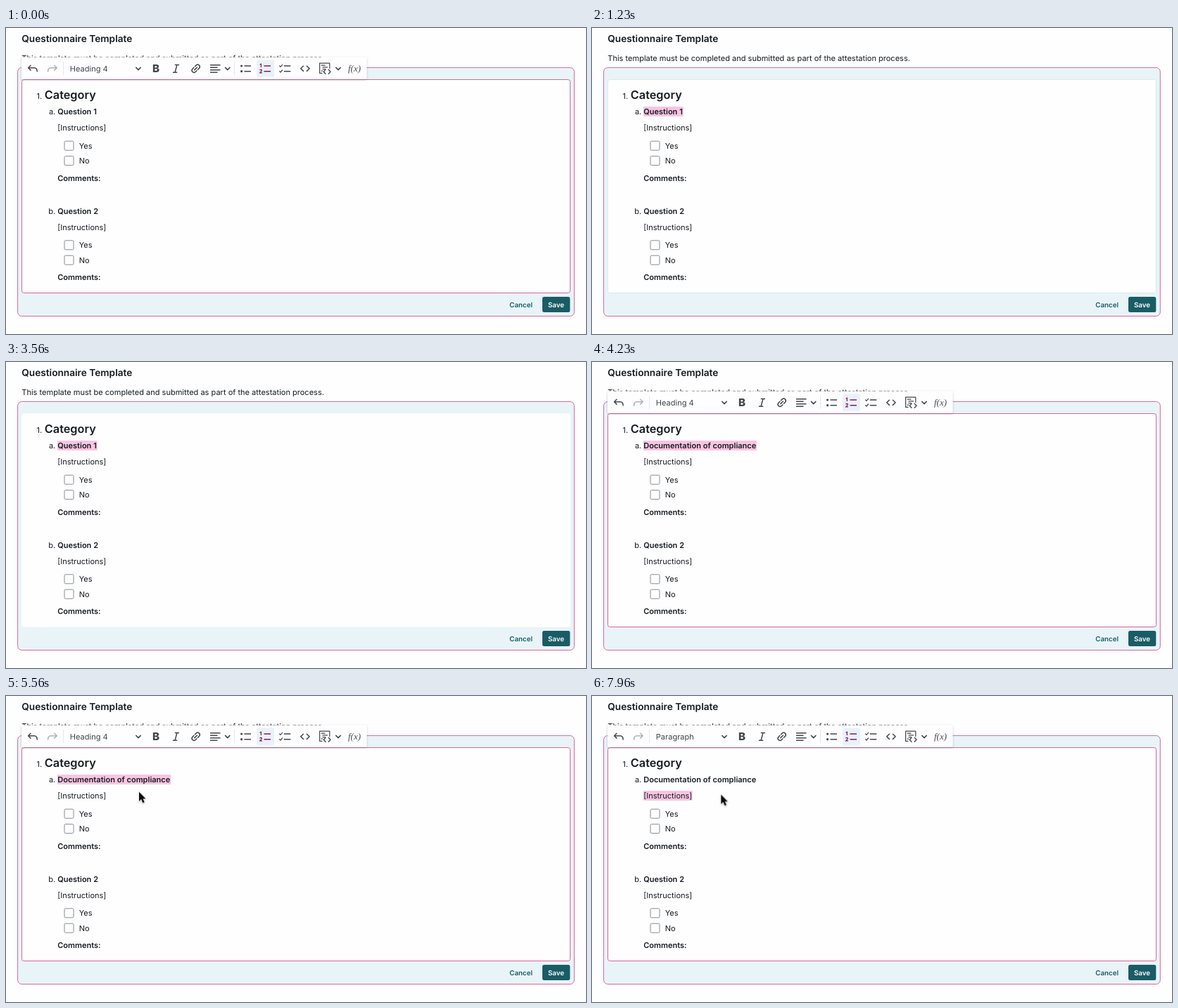
Write an HTML page that moves like this. It is 824 px wide and 436 px high and loops after 8 s.

```html
<!DOCTYPE html>
<html lang="en">
<head>
<meta charset="utf-8">
<title>Questionnaire Template</title>
<style>
  html, body { margin: 0; width: 100%; height: 100%; overflow: hidden; background: #fdfefd; }
  svg { display: block; width: 100vw; height: 100vh; }
  text {
    font: 400 11.04px Inter, "Open Sans", sans-serif;
    font-optical-sizing: none;
    text-rendering: geometricPrecision;
    fill: #161b22;
    white-space: pre;
  }
  .strong { font-weight: 600; font-size: 11.06px; }
  .title { font-weight: 600; font-size: 13.68px; }
  .category { font-weight: 600; font-size: 16.3px; }
  .num { text-anchor: end; }
  .button { font-weight: 600; font-size: 9.75px; }
  .cancel { fill: #1b5c66; }
  .save { fill: #fff; }
  .label { fill: #3f454b; }
  .bold { font-size: 15.2px; font-weight: 800; fill: #42474c; }
  .fx { font: italic 13px "Liberation Serif", serif; fill: #454a4f; }
  .mark { fill: #f8c5e2; }
  .box { fill: #fefefe; stroke: #7b8085; stroke-width: .9; }
  .panel { fill: #e8f4f7; stroke: #d2347c; stroke-width: .75; }
  .icon { fill: none; stroke: #42474c; stroke-width: 1.5; stroke-linecap: round; stroke-linejoin: round; }
  .flat { stroke-linecap: butt; stroke-linejoin: miter; }

  /* Timeline: 500 select, 1100 blur, 3800 replace, 6000 click, 7000 select */
  .step { animation: 8s step-end infinite; }
  .toolbar { animation-name: toolbar; }
  .early { animation-name: early; }
  .late { animation-name: late; }
  .before-click { animation-name: before-click; }
  .after-click { animation-name: after-click; }
  .mark-old { animation-name: mark-old; }
  .mark-new { animation-name: mark-new; }
  .mark-note { animation-name: mark-note; }
  .caret { animation-name: caret; }
  .editor { fill: #fefefe; stroke: #d0437f; stroke-width: .8; animation: editor 8s linear infinite; }
  .pointer { animation: move 8s infinite; }

  @keyframes toolbar { 0%, 47.5%, 100% { opacity: 1 } 13.75% { opacity: 0 } }
  @keyframes early { 0% { opacity: 1 } 47.5%, 100% { opacity: 0 } }
  @keyframes late { 0% { opacity: 0 } 47.5%, 100% { opacity: 1 } }
  @keyframes before-click { 0% { opacity: 1 } 75%, 100% { opacity: 0 } }
  @keyframes after-click { 0% { opacity: 0 } 75%, 100% { opacity: 1 } }
  @keyframes mark-old { 0%, 47.5%, 100% { opacity: 0 } 6.25% { opacity: 1 } }
  @keyframes mark-new { 0%, 75%, 100% { opacity: 0 } 47.5% { opacity: 1 } }
  @keyframes mark-note { 0% { opacity: 0 } 87.5%, 100% { opacity: 1 } }
  @keyframes caret { 0%, 81.25%, 100% { opacity: 0 } 75% { opacity: 1 } }
  @keyframes editor {
    0%, 13.74% { stroke: #d0437f }
    13.75%, 15.4% { stroke: #d3e6ec }
    18.5%, 47.49% { stroke: #fefefe }
    47.5%, 100% { stroke: #d0437f }
  }
  @keyframes move {
    0% { opacity: 0; transform: translate(225px, 105px); animation-timing-function: step-end }
    66.25% { opacity: 1; transform: translate(225px, 105px); animation-timing-function: ease-out }
    69.5% { opacity: 1; transform: translate(189px, 136.5px); animation-timing-function: ease-out }
    71.5%, 100% { opacity: 1; transform: translate(183.3px, 140.5px) }
  }
</style>
</head>
<body>
<svg viewBox="0 0 824 436">
  <defs>
    <filter id="shadow" x="-5%" y="-30%" width="110%" height="170%">
      <feDropShadow dx="0" dy="1" stdDeviation="1.6" flood-color="#1b2a35" flood-opacity=".24"/>
    </filter>
    <filter id="soft" x="-50%" y="-50%" width="200%" height="200%">
      <feDropShadow dx="0" dy="1" stdDeviation=".9" flood-opacity=".3"/>
    </filter>
    <path id="chevron" d="M-3.2 -1.6 L0 1.6 L3.2 -1.6"/>
    <g id="answers">
      <rect class="box" x="83" y="161.2" width="13" height="13" rx="1.6"/>
      <text x="103.7" y="171.6">Yes</text>
      <rect class="box" x="83" y="182.6" width="13" height="13" rx="1.6"/>
      <text x="103.7" y="193">No</text>
      <text class="strong" x="73.2" y="217.5">Comments:</text>
    </g>
  </defs>

  <rect width="824" height="436" fill="#fdfefd"/>
  <text class="title" x="22.2" y="20.4">Questionnaire Template</text>
  <text x="22.3" y="47.3">This template must be completed and submitted as part of the attestation process.</text>

  <rect class="panel" x="16.6" y="56.4" width="790.7" height="354.2" rx="6"/>
  <rect class="editor" x="22.5" y="73.5" width="779" height="304" rx="3"/>

  <rect class="mark step mark-old" x="73" y="112" width="56.7" height="14"/>
  <rect class="mark step mark-new" x="73" y="112" width="161" height="14"/>
  <rect class="mark step mark-note" x="73" y="135" width="69.7" height="14"/>

  <text class="num" x="51.2" y="101.2">1.</text>
  <text class="category" x="54.8" y="101.2">Category</text>
  <text class="num" x="70.3" y="123">a.</text>
  <text class="strong step early" x="73.2" y="123">Question 1</text>
  <text class="strong step late" x="73.2" y="123">Documentation of compliance</text>
  <text x="73.2" y="146">[Instructions]</text>
  <use href="#answers"/>

  <text class="num" x="70.3" y="265">b.</text>
  <text class="strong" x="73.2" y="265">Question 2</text>
  <text x="73.2" y="287.5">[Instructions]</text>
  <use href="#answers" y="141.6"/>

  <rect class="step caret" x="142.7" y="135" width=".9" height="14" fill="#555"/>

  <text class="button cancel" x="715.3" y="397.6">Cancel</text>
  <rect x="762" y="383" width="39.3" height="22" rx="2.5" fill="#1a5c66"/>
  <text class="button save" x="770" y="397.6">Save</text>

  <g class="step toolbar">
    <rect x="22" y="41.5" width="490.5" height="31.5" rx="2" fill="#fefefe" filter="url(#shadow)"/>
    <path d="M81.5 48V67M324.5 48V67" stroke="#e3e6e8"/>
    <rect x="356" y="45.5" width="25" height="24.5" rx="2" fill="#e8f2fa"/>

    <g class="icon">
      <path id="undo" d="M35 53.3 L31.6 56.7 L35 60.1 M31.8 56.7 H40 C43 56.7 44.3 59 44.2 62"/>
      <use href="#undo" transform="translate(103.8) scale(-1 1)" opacity=".42"/>
      <use href="#chevron" x="188" y="58"/>
      <use href="#chevron" x="314.7" y="58"/>
      <use href="#chevron" x="472" y="58"/>
      <path class="flat" d="M239.8 52.6H246M237 63.2H243.2M242.9 52.6L240.1 63.2"/>
      <g transform="translate(269.7 57.8) rotate(-45)">
        <path d="M-1 -3H-3.6A3 3 0 0 0 -3.6 3H-1.4M1 3H3.6A3 3 0 0 0 3.6 -3H1.4M-2.6 0H2.6"/>
      </g>
      <path class="flat" d="M290 52.7H304.5M290 56.2H300.5M290 59.7H304.5M290 63.2H300.5"/>
      <path class="flat" d="M338.5 54H348M338.5 61.7H348"/>
      <path class="flat" d="M394.8 54H404.3M394.8 61.7H404.3"/>
      <path d="M388.6 54L390 55.3L392.6 52.3M388.6 61.7L390 63L392.6 60" stroke-width="1.2"/>
      <path d="M422.4 54.2L418.7 57.8L422.4 61.4M427.4 54.2L431.1 57.8L427.4 61.4"/>
      <g stroke-width="1.2">
        <path d="M449 64.3H445.6V50.2H459.8V57.5"/>
        <path d="M448.2 53.2H453M450 55.9H456.5M450 58.6H453.5M448.2 61.2H449.6"/>
        <path d="M454 59.2L451.2 62.2L454 65.2M458.2 59.2L461 62.2L458.2 65.2" stroke-width="1.4"/>
      </g>
    </g>
    <g fill="#42474c">
      <circle cx="334.6" cy="54" r="1.6"/>
      <circle cx="334.6" cy="61.7" r="1.6"/>
    </g>
    <g fill="none" stroke="#8d1759" stroke-width="1.5">
      <path d="M366.5 54H376M366.5 61.7H376"/>
      <path d="M360.6 52.2L362.4 51.3V56M360.6 60.4C361 58.9 363.8 59 363.4 60.8L360.7 63.8H364" stroke-width="1.2"/>
    </g>
    <text class="bold" x="208" y="63.2">B</text>
    <text class="label step before-click" x="90.8" y="61.6">Heading 4</text>
    <text class="label step after-click" x="90.8" y="61.6">Paragraph</text>
    <text class="fx" x="486" y="62">f(x)</text>
  </g>

  <g class="pointer">
    <path d="M0 0V13.4L3.1 10.6L5.3 15.8L7.8 14.7L5.6 9.7H9.6Z" fill="#080808" stroke="#fff" stroke-width="1.1" paint-order="stroke" filter="url(#soft)"/>
  </g>
</svg>
</body>
</html>
```
